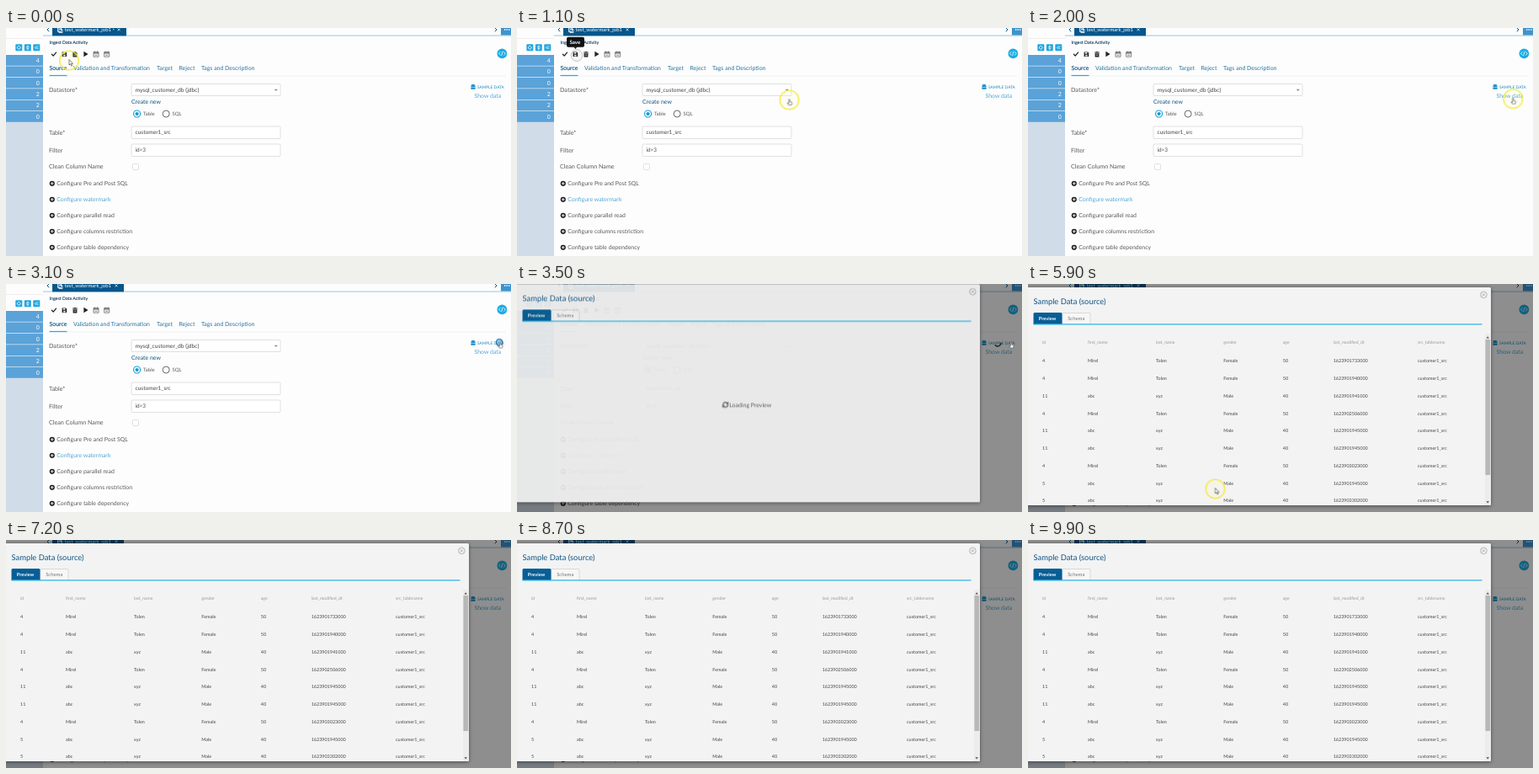
An HTML page for the animation above (10000 ms loop, 600x271 px).

```html
<!DOCTYPE html>
<html lang="en">
<head>
<meta charset="utf-8">
<title>Sample data preview</title>
<style>
  html, body { margin: 0; width: 100%; height: 100%; overflow: hidden; background: #fdfdfd; }
  svg { display: block; width: 100vw; height: 100vh; }
  text { font: 6.95px Lato, sans-serif; fill: #5a5a5a; text-rendering: geometricPrecision; }
  .label text { font-size: 7.2px; }
  .link { fill: #52a8d6; }
  .navy { fill: #0d5687; }
  .head text { font-size: 5.15px; fill: #999; }
  .cells text { font-size: 5.45px; fill: #444; }
  .box { fill: #fff; stroke: #d9d9d9; stroke-width: .8; }
  .line { fill: none; stroke-linecap: round; stroke-linejoin: round; }

  .dirty, .clean, .tip, .loading, .table, .arrow, .hand, .wait {
    animation: 10s step-end infinite;
  }
  .dirty { animation-name: dirty; }
  .clean { animation-name: clean; }
  .tip { animation-name: tip; }
  .loading { animation-name: loading; }
  .table { animation-name: table; }
  .arrow { animation-name: arrow; }
  .hand { animation-name: hand; }
  .wait { animation-name: wait; }
  .veil { animation: veil 10s linear infinite; }
  .modal { animation: modal 10s ease-out infinite; }
  .cursor { animation: move 10s ease-in-out infinite; }
  .halo { animation: halo 10s linear infinite; }
  .press { animation: press 10s linear infinite; }
  .spin { animation: spin 1s linear infinite; }

  @keyframes dirty { 0% { opacity: 1 } 5%, 100% { opacity: 0 } }
  @keyframes clean { 0% { opacity: 0 } 5%, 100% { opacity: 1 } }
  @keyframes tip { 0% { opacity: 0 } 3% { opacity: 1 } 12%, 100% { opacity: 0 } }
  @keyframes loading { 0% { opacity: 1 } 52%, 100% { opacity: 0 } }
  @keyframes table { 0% { opacity: 0 } 52%, 100% { opacity: 1 } }
  @keyframes arrow { 0% { opacity: 1 } 2% { opacity: 0 } 53%, 100% { opacity: 1 } }
  @keyframes hand { 0% { opacity: 0 } 2% { opacity: 1 } 53%, 100% { opacity: 0 } }
  @keyframes wait { 0% { opacity: 0 } 33% { opacity: 1 } 51%, 100% { opacity: 0 } }
  @keyframes veil { 0%, 32% { opacity: 0 } 34.5%, 100% { opacity: 1 } }
  @keyframes modal {
    0%, 32% { opacity: 0; transform: translateY(-40px) }
    36%, 100% { opacity: 1; transform: none }
  }
  @keyframes move {
    0%, 1% { transform: translate(75px, 38px) }
    3%, 9.4% { transform: translate(70px, 32px) }
    11% { transform: translate(323.5px, 85px) }
    13%, 14.4% { transform: translate(341px, 93px) }
    18%, 19.5% { transform: translate(576px, 84px) }
    24%, 52% { transform: translate(587px, 69.5px) }
    58%, 61.5% { transform: translate(222.5px, 243px) }
    70%, 100% { transform: translate(-20px, 258px) }
  }
  @keyframes halo { 0%, 24% { opacity: 1 } 28%, 52% { opacity: 0 } 53%, 100% { opacity: 1 } }
  @keyframes press {
    0%, 29% { opacity: 0; transform: scale(.3) }
    30%, 31.9% { opacity: 1; transform: none }
    33%, 100% { opacity: 0; transform: scale(1.2) }
  }
  @keyframes spin { to { transform: rotate(360deg) } }
</style>
</head>
<body>
<svg viewBox="0 0 600 271" preserveAspectRatio="none">
  <defs>
    <filter id="shade" x="-5%" y="-5%" width="110%" height="115%">
      <feDropShadow dx="0" dy="1" stdDeviation="2" flood-opacity=".45"/>
    </filter>
    <clipPath id="sheet"><rect y="4" width="550" height="258.5"/></clipPath>
  </defs>

  <!-- page -->
  <rect width="600" height="271" fill="#fdfdfd"/>
  <path d="M0 12.5H44" stroke="#ebebeb" stroke-width=".8"/>
  <rect y="112" width="44" height="159" fill="#d0dce7"/>
  <g id="counts"></g>
  <g id="tools"></g>

  <path d="M44 9H600" stroke="#8ccbea" stroke-width="1"/>
  <path class="line" d="M51 0L49 2L51 4M581 0L583 2L581 4" stroke="#0d5687"/>
  <rect x="588" width="12" height="8.5" fill="#3f93cc"/>
  <path d="M592 2h1.4M594.6 2h1.4M597.2 2h1.4" stroke="#fff" stroke-width="1.4"/>
  <rect x="55" width="85" height="9.3" fill="#07568b"/>
  <g class="dirty">
    <rect x="139" width="4" height="9.3" fill="#07568b"/>
    <text x="126.5" y="5" style="fill:#fff;font-size:6px">*</text>
    <path d="M132.6 .4l3 3m0-3l-3 3" stroke="#fff" stroke-width=".7"/>
  </g>
  <path class="clean" d="M129.6 .4l3 3m0-3l-3 3" stroke="#fff" stroke-width=".7"/>
  <path d="M61.5 0h4v4.5h-4zM63 1.5h4v4h-4z" fill="none" stroke="#fff" stroke-width=".8"/>
  <text x="69.5" y="4" style="fill:#fff;font-size:6px">test_watermark_job1</text>

  <text x="51.5" y="18.8" style="fill:#123f60;font-size:5.3px;stroke:#123f60;stroke-width:.12">Ingest Data Activity</text>
  <g class="tip"><circle cx="71" cy="32.6" r="6.8" fill="#f6f6f6" stroke="#aaa" stroke-width=".7"/></g>
  <g fill="#222">
    <path class="line" d="M54.4 31.2l1.8 1.9l3.3-4" fill="none" stroke="#222" stroke-width="1.3"/>
    <path d="M66.6 28.4h4.4l1.2 1.2v4.4h-5.6z"/>
    <path d="M67.8 29h2.6v1.5h-2.6zM68.2 31.8h2.4v1.6h-2.4z" fill="#fff"/>
    <path class="dirty" d="M79.4 28.2h3.4l1.8 1.8v4.4h-5.2z"/>
    <path class="clean" d="M79.2 28.6h1.6l.5-.7h1.4l.5 .7h1.6v1h-5.6zM79.6 30h4.8v4.4h-4.8z"/>
    <path d="M80.7 31h2.6M80.7 32.6h2.6" stroke="#fff" stroke-width=".5"/>
    <path d="M92.4 27.8L97.6 31L92.4 34.2z"/>
  </g>
  <g fill="none" stroke="#666" stroke-width=".8">
    <path id="day" d="M104 28.6h6v5.6h-6zM104 29.4h6M104 30.1h6M105.5 27.4v1.6M108.5 27.4v1.6M105.4 32.2h3.2"/>
    <use href="#day" x="12.7"/>
  </g>
  <g class="tip">
    <rect x="59" y="10.8" width="21" height="12" rx="2" fill="#111"/>
    <path d="M67.5 22.6h4l-2 2.4z" fill="#111"/>
    <text x="62.4" y="19.1" style="fill:#fff;font-size:6.2px;font-weight:700">Save</text>
  </g>
  <circle cx="589.4" cy="30.3" r="5.9" fill="#1badE4"/>
  <path class="line" d="M587.2 28.6L585.4 30.3L587.2 32M591.6 28.6L593.4 30.3L591.6 32M590.1 28L588.7 32.6" stroke="#fff" stroke-width=".8"/>

  <path d="M51 57H594" stroke="#e8ebed" stroke-width=".6"/>
  <path d="M51.5 56.5H72.5" stroke="#2aa7dc" stroke-width="1.2"/>
  <text x="51.5" y="50.2" class="navy" style="stroke:#0d5687;stroke-width:.15">Source</text>
  <g id="tabs"></g>

  <g class="label">
    <text x="51" y="75.6">Datastore<tspan fill="#444">*</tspan></text>
    <text x="51" y="126.6">Table<tspan fill="#444">*</tspan></text>
    <text x="51" y="147.6">Filter</text>
    <text x="51" y="166.7">Clean Column Name</text>
  </g>
  <rect class="box" x="149" y="66.5" width="177" height="14" rx="1"/>
  <text x="153.5" y="75.8" style="font-size:6.7px;fill:#444">mysql_customer_db (jdbc)</text>
  <path d="M318.8 72.7h4l-2 2.4z" fill="#888"/>
  <text x="149" y="89.6" class="navy">Create new</text>
  <circle cx="155.6" cy="102" r="4" fill="#fff" stroke="#1499d6" stroke-width="1.1"/>
  <circle cx="155.6" cy="102" r="2.1" fill="#1499d6"/>
  <circle cx="190.2" cy="102" r="4" fill="#fff" stroke="#555" stroke-width=".9"/>
  <text x="163" y="104.2" style="font-size:6px">Table</text>
  <text x="197.5" y="104.2" style="font-size:6px">SQL</text>
  <rect class="box" x="149" y="117" width="177" height="14.5" rx="1"/>
  <rect class="box" x="149" y="138" width="177" height="14.5" rx="1"/>
  <text x="153.5" y="126.4" style="font-size:6.6px;fill:#444">customer1_src</text>
  <text x="153.5" y="147.4" style="font-size:6.4px;fill:#444">id&gt;3</text>
  <rect class="box" x="150.5" y="161.5" width="7" height="7" rx="1"/>
  <g id="config"></g>

  <g fill="#1a8cc6">
    <ellipse cx="555" cy="68" rx="2.6" ry="1.1"/>
    <path d="M552.4 68.9h5.2v1.5h-5.2zM552.4 71h5.2v1.8h-5.2z"/>
    <text x="560" y="72" style="fill:#1a8cc6;font-size:4.8px">SAMPLE DATA</text>
  </g>
  <text x="556.5" y="83.4" class="link">Show data</text>

  <!-- dialog -->
  <g class="veil"><rect width="600" height="271" fill="#000" opacity=".44"/></g>
  <g class="wait">
    <g transform="translate(571 70)"><path class="line spin" d="M-4 0A4 4 0 0 1 2.8 -2.8" stroke="#222" stroke-width="1.3"/></g>
  </g>
  <g class="modal">
    <rect x="-4" y="4" width="554" height="259" rx="1.5" fill="#f3f3f3" filter="url(#shade)"/>
    <circle cx="541.4" cy="12.8" r="3.8" fill="none" stroke="#999" stroke-width=".7"/>
    <path d="M539.8 11.2l3.2 3.2m0-3.2l-3.2 3.2" stroke="#999" stroke-width=".7"/>
    <text x="6.5" y="24.3" class="navy" style="font-size:9.4px">Sample Data (source)</text>
    <path d="M40.5 47V35.5q0-1 1-1H73q1 0 1 1V47" fill="#f7f7f7" stroke="#ccc" stroke-width=".7"/>
    <path d="M6.5 48V35.5q0-1.5 1.5-1.5H39q1.5 0 1.5 1.5V48z" fill="#075e96"/>
    <path d="M6.5 47.8H539.5" stroke="#2db4e6" stroke-width="1.3"/>
    <text x="12.8" y="43" style="fill:#fff;font-size:5.7px;font-weight:700">Preview</text>
    <text x="47.2" y="43" style="fill:#777;font-size:5.9px">Schema</text>
    <g class="loading">
      <g transform="translate(247.6 147.2)"><g class="spin">
        <path d="M-2.9 .6A3 3 0 0 1 1.9 -2.3M2.9 -.6A3 3 0 0 1 -1.9 2.3" fill="none" stroke="#444" stroke-width="1.2"/>
        <path d="M3.5 -3.8V-.8H.5zM-3.5 3.8V.8H-.5z" fill="#444"/>
      </g></g>
      <text x="252.3" y="149.7">Loading Preview</text>
    </g>
    <g class="table" clip-path="url(#sheet)">
      <g id="head" class="head"></g>
      <g id="cells" class="cells"></g>
      <rect x="543" y="59" width="6.5" height="204" fill="#ececec"/>
      <rect x="543.4" y="66" width="5.8" height="161" fill="#b8b8b8"/>
      <path d="M544.4 64.6h3.6l-1.8-2.4zM544.4 258.2h3.6l-1.8 2.4z" fill="#555"/>
    </g>
  </g>

  <!-- pointer -->
  <g class="cursor">
    <circle class="halo" r="11.3" cy=".5" fill="#ffff90" fill-opacity=".08" stroke="#f3ea3a" stroke-opacity=".85" stroke-width="1.6"/>
    <circle class="press" r="3.8" cx="-.8" fill="#6fb4e0" fill-opacity=".7" stroke="#1b6fae" stroke-width="1.3"/>
    <path class="arrow" d="M0 -.5V6L1.5 4.7L2.6 7.1L3.6 6.6L2.6 4.3H4.5z" fill="#fff" stroke="#333" stroke-width=".6"/>
    <path class="hand line" d="M-.7 0Q0 -.8 .7 0V2.6L3 3.2Q3.4 5 2.6 6.6H-.8L-2.4 4.2Q-2.2 3.3 -.7 4.4z" style="fill:#fff" stroke="#333" stroke-width=".55"/>
  </g>
</svg>
<script>
  const put = (id, markup) => { document.getElementById(id).innerHTML = markup; };
  const text = (x, y, s, attrs = '') => `<text x="${x}" y="${y}" ${attrs}>${s}</text>`;

  put('counts', [4, 0, 0, 2, 2, 0].map((n, i) => {
    const y = 32 + i * 13.4;
    return `<rect y="${y}" width="44" height="12.8" fill="#5aa2d8"/>` +
      text(39.7, y + 8.8, n, 'text-anchor="end" style="fill:#fff"');
  }).join(''));

  const glyphs = [
    'M-1.8 .4A1.8 1.8 0 0 1 1.5 -1M1.8 -.4A1.8 1.8 0 0 1 -1.5 1',
    'M0 -2V2M-1.3 -.8L0 -2L1.3 -.8M-1.3 .8L0 2L1.3 .8',
    'M-.2 -1.6L-1.8 0L-.2 1.6M1.8 -1.6L.2 0L1.8 1.6',
  ];
  put('tools', glyphs.map((d, i) =>
    `<g transform="translate(${15.3 + i * 10.5} 23.3)"><rect x="-4" y="-4" width="8" height="8" rx="1" fill="#22a6e2"/>` +
    `<path class="line" d="${d}" stroke="#fff" stroke-width=".8"/></g>`).join(''));

  put('tabs', [[80, 'Validation and Transformation'], [179, 'Target'], [205.5, 'Reject'], [232, 'Tags and Description']]
    .map(([x, s]) => text(x, 50.2, s, 'style="fill:#27739f"')).join(''));

  put('config', ['Pre and Post SQL', 'watermark', 'parallel read', 'columns restriction', 'table dependency']
    .map((s, i) => {
      const y = 184.8 + i * 19;
      return `<circle cx="54.8" cy="${y}" r="3.1" fill="#222"/>` +
        `<path d="M53 ${y}h3.6M54.8 ${y - 1.8}v3.6" stroke="#fff" stroke-width=".9"/>` +
        text(60.3, y + 2.4, 'Configure ' + s, i === 1 ? 'class="link"' : '');
    }).join(''));

  const cols = [17, 71, 152, 232.3, 302.8, 362.7, 463];
  const row = (cells, y) => cells.map((s, i) => text(cols[i], y, s)).join('');
  const woman = ['Mirel', 'Tolen', 'Female', 50];
  const man = ['abc', 'xyz', 'Male', 40];
  const records = [
    [4, 1733], [4, 1940], [11, 1941], [4, 2506], [11, 1945],
    [11, 1945], [4, 3023], [5, 1945], [5, 3302],
  ];
  put('head', row(['id', 'first_name', 'last_name', 'gender', 'age', 'last_modified_dt', 'src_tablename'], 70.6));
  put('cells', records.map(([id, stamp], i) =>
    row([id, ...(id === 4 ? woman : man), `162390${stamp}000`, 'customer1_src'], 93.3 + i * 20.75)).join(''));
</script>
</body>
</html>
```
